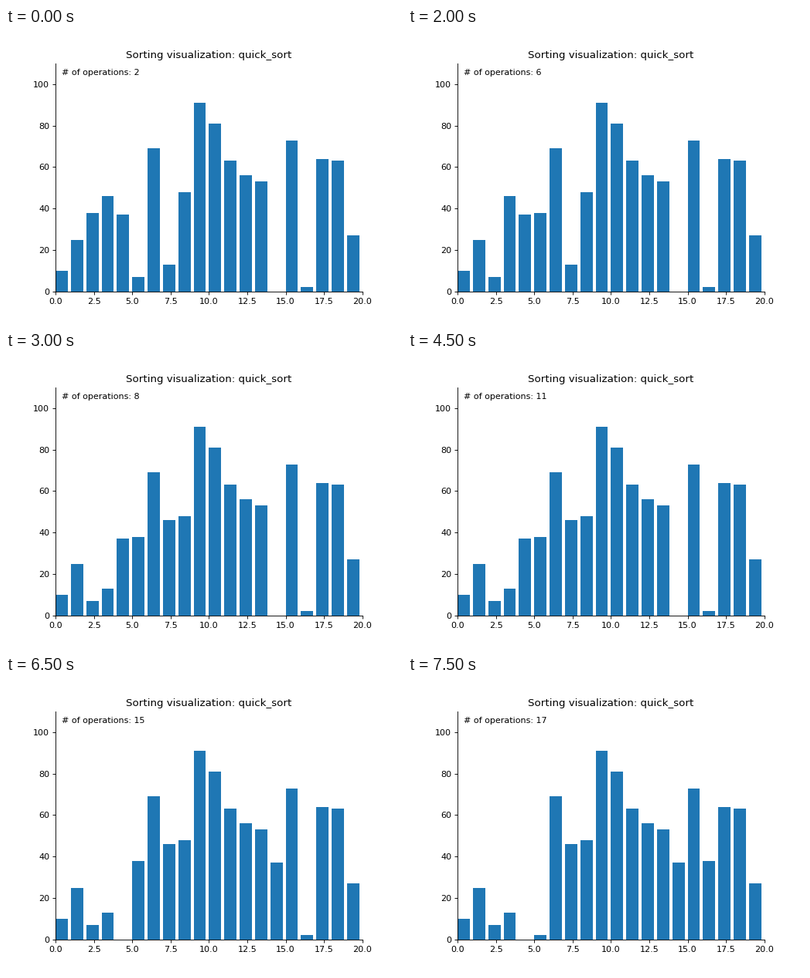
Recreate the animation shown at these times as a matplotlib script. Size 512 by 384 pixels, loop 8000 ms.

```python
import matplotlib.pyplot as plt
from matplotlib.animation import FuncAnimation

VALUES = [10, 25, 38, 46, 37, 7, 69, 13, 48, 91,
          81, 63, 56, 53, 0, 73, 2, 64, 63, 27]
FIRST_OP, LAST_OP = 2, 17


def partition_after(ops):
    """State of the first quicksort partition after `ops` comparisons."""
    a = VALUES.copy()
    pivot, split = a[-1], 0
    for j in range(ops):
        if a[j] < pivot:
            a[split], a[j] = a[j], a[split]
            split += 1
    return a


fig, ax = plt.subplots(figsize=(6.4, 4.8), dpi=80)
ax.set_title("Sorting visualization: quick_sort")
bars = ax.bar(range(len(VALUES)), VALUES, align="edge")
ax.set_xlim(0, len(VALUES))
ax.set_ylim(0, 110)
ax.spines[["top", "right"]].set_visible(False)
label = ax.text(0.02, 0.95, "", transform=ax.transAxes)


def update(frame):
    ops = FIRST_OP + frame
    for bar, value in zip(bars, partition_after(ops)):
        bar.set_height(value)
    label.set_text(f"# of operations: {ops}")
    return [*bars, label]


anim = FuncAnimation(fig, update, frames=LAST_OP - FIRST_OP + 1,
                     interval=500, repeat=True, repeat_delay=0)
plt.show()
```
